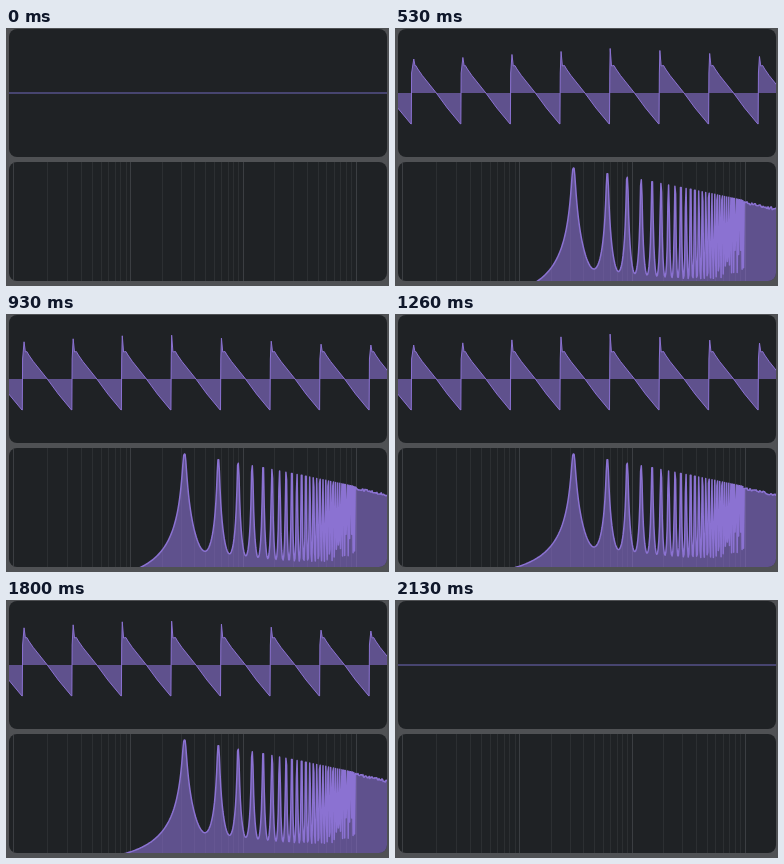
Animation, 383 px wide and 258 px high, one loop 2.26 s. Source, as an HTML page with a canvas:

```html
<!DOCTYPE html>
<html>
<head>
<meta charset="utf-8">
<style>
html, body { margin: 0; width: 100%; height: 100%; overflow: hidden; background: #4f5154 }
canvas { display: block }
</style>
</head>
<body>
<canvas id="stage" width="383" height="258"></canvas>
<script>
const ctx = document.getElementById('stage').getContext('2d');
const LOOP = 2260, LEFT = 3, RIGHT = 381, MID = 65, BOTTOM = 253;
const PERIOD = 49.55, DECADE = 112.5, BASE = 33.1;
const LAST_ON = 28, FALL = 33;

const freqToX = f => 7.5 + DECADE * Math.log10(f);
const xToFreq = x => 10 ** ((x - 7.5) / DECADE);
const noise = n => { const s = Math.sin(n * 127.1) * 43758.5; return s - Math.floor(s); };

// Height of the n-th harmonic's tip
function tipY(n) {
  const oct = Math.log2(n);
  return 140 + 5.5 * oct + 0.2 * oct * oct;
}

function panel(y, h, draw) {
  ctx.save();
  ctx.beginPath();
  ctx.roundRect(LEFT, y, RIGHT - LEFT, h, 8);
  ctx.fillStyle = '#1f2225';
  ctx.fill();
  ctx.clip();
  draw();
  ctx.restore();
}

function plot(points, floor, width) {
  const path = new Path2D();
  points.forEach(([x, y]) => path.lineTo(x, y));
  const area = new Path2D(path);
  area.lineTo(points[points.length - 1][0], floor);
  area.lineTo(points[0][0], floor);
  ctx.fillStyle = 'rgba(138,112,210,.6)';
  ctx.fill(area);
  ctx.strokeStyle = '#8b72d2';
  ctx.lineWidth = width;
  ctx.lineJoin = 'round';
  ctx.stroke(path);
}

function grid() {
  for (let f = 1, step = 1; step <= 1000; step *= 10) {
    for (let i = 0; i < 10; i++, f += step) {
      ctx.fillStyle = i ? '#2c2f32' : '#3b3e42';
      ctx.fillRect(Math.floor(freqToX(f)), 134, 1, 119);
    }
  }
}

function wave(step) {
  if (step < 1 || step > LAST_ON) {
    ctx.fillStyle = '#474570';
    ctx.fillRect(LEFT, 64, RIGHT - LEFT, 2);
    return;
  }
  const center = 3.4 + 0.8 * Math.sin(0.47 * (step - 4));
  const points = [];
  for (let i = -1; i < 8; i++) {
    const x = 16.3 + i * PERIOD, off = i - center;
    const top = 20 + Math.min(11, Math.abs(off) * 3);
    const peak = off < 0 ? 0.6 - off * 0.45 : 0.6 + off * 0.25;
    points.push([x, 96], [x + 0.3, 45], [x + peak, top], [x + peak + 1.3, 38],
      [x + 4.5, 37.5], [x + 6.5, 41], [x + 11, 47.5], [x + 25, 65], [x + 36, 80], [x + PERIOD - 0.3, 96]);
  }
  plot(points, MID, 1);
}

function spectrum(step) {
  if (step < 1) return;
  const shift = FALL * Math.max(0, step - LAST_ON);
  const slope = 19.2 - 0.9 * Math.cos(0.8 * (step - 4));
  const points = [];
  for (let x = 100; x < RIGHT + 2; x += 0.7) {
    const f = xToFreq(x);
    let y;
    if (x > 349) {
      y = tipY(f / BASE) + 2.5 * noise(Math.round(x) + step * 7);
    } else {
      const half = f * Math.LN10 / DECADE * 0.4;
      let sum = 0;
      for (let n = 1; n < 40; n++) {
        const d = Math.max(0, Math.abs(f - n * BASE) - half) / 0.96;
        sum += Math.exp(-tipY(n) / slope) / (1 + d * d);
      }
      y = -slope * Math.log(sum);
    }
    points.push([x, y + shift]);
  }
  plot(points, Math.max(BOTTOM + 3, BOTTOM + shift), 1.5);
}

function frame(now) {
  const t = Math.floor(now % LOOP / 10) * 10;
  const step = Math.min(32, Math.floor((t + 9) * 0.015));
  ctx.fillStyle = '#4f5154';
  ctx.fillRect(0, 0, 383, 258);
  panel(1, 128, () => wave(step));
  panel(134, 119, () => { grid(); spectrum(step); });
  requestAnimationFrame(frame);
}
frame(0);
</script>
</body>
</html>
```
